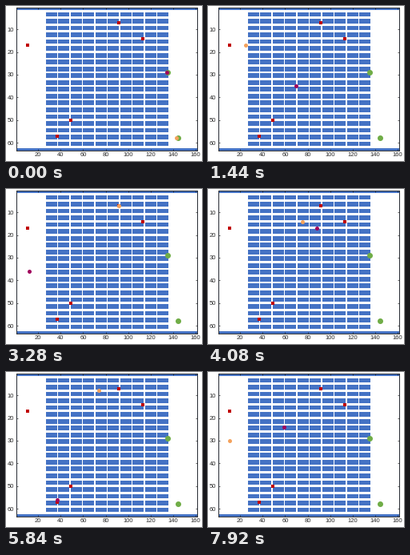
Recreate the animation shown at these times as a matplotlib script. Size 245 by 194 pixels, loop 8000 ms.

```python
import numpy as np
import matplotlib.pyplot as plt
from matplotlib.animation import FuncAnimation
from matplotlib.colors import ListedColormap

W, H, DPI = 245, 194, 100
FRAMES, INTERVAL = 100, 80
STEPS_PER_FRAME = 10
COLS, ROWS = 161, 63
BLUE, RED, GREEN = "#4472C4", "#C00000", "#70AD47"
ORANGE, PURPLE = "#F4A25C", "#A0005C"

plt.rcParams["font.family"] = "Liberation Sans"


def px(n):
    """Pixels to points."""
    return n * 72 / DPI


def warehouse():
    grid = np.zeros((ROWS, COLS))
    grid[[0, -1], :] = 1
    grid[:, [0, -1]] = 1
    for top in range(2, 61, 3):
        for left in range(26, 135, 11):
            grid[top:top + 2, left:left + 10] = 1
    return grid


def walk(waypoints):
    """One cell per step along straight legs; an optional third value is a wait."""
    x, y = waypoints[0][:2]
    path = [(x, y)]
    for gx, gy, *wait in waypoints[1:]:
        while (x, y) != (gx, gy):
            x += int(np.sign(gx - x))
            y += int(np.sign(gy - y))
            path.append((x, y))
        path += [(x, y)] * sum(wait)
    return path


orange_path = walk([
    (144, 58), (136, 58), (136, 8), (92, 8), (92, 7, 1),
    (92, 8), (59, 8), (59, 17), (11, 17, 1),
    (14, 17), (14, 23), (23, 23), (23, 50), (49, 50),
    (92, 50), (92, 7, 78),
    (92, 8), (103, 8), (103, 14), (113, 14, 14),
    (59, 14), (59, 53), (37, 53), (37, 57),
    (37, 56), (24, 56), (24, 40), (11, 40), (11, 17, 1),
    (24, 17), (24, 8), (92, 8), (92, 7, 37),
    (92, 8), (103, 8), (103, 14), (113, 14, 2),
    (59, 14, 2), (59, 53), (37, 53), (37, 57),
    (37, 53), (11, 53), (11, 17),
])

purple_path = walk([
    (135, 29), (48, 29), (48, 53), (37, 53), (37, 57),
    (37, 53), (70, 53), (70, 17), (103, 17), (103, 14), (113, 14, 1),
    (70, 14), (70, 56), (37, 56), (37, 57),
    (37, 56), (12, 56), (12, 17), (11, 17, 3),
    (103, 17), (103, 14), (113, 14),
    (103, 14), (103, 8), (92, 8), (92, 7),
    (92, 8), (103, 8), (103, 14), (113, 14, 8),
    (70, 14), (70, 56), (37, 56), (37, 57, 8),
    (37, 56), (15, 56), (15, 22), (11, 22), (11, 17),
    (103, 17), (103, 14), (113, 14, 1),
    (103, 14), (103, 8), (92, 8), (92, 7, 11),
    (92, 8), (59, 8), (59, 26),
])

fig = plt.figure(figsize=(W / DPI, H / DPI), dpi=DPI, facecolor="white")
left, right, top, bottom = 12.7, 239.2, 2.2, 181
ax = fig.add_axes([left / W, 1 - bottom / H, (right - left) / W, (bottom - top) / H])
ax.imshow(warehouse(), cmap=ListedColormap(["white", BLUE]), aspect="auto",
          interpolation="nearest", extent=(0.5, COLS + 0.5, ROWS + 0.5, 0.5))
ax.set_xticks(range(20, 161, 20))
ax.set_yticks(range(10, 61, 10))
ax.tick_params(direction="in", top=True, right=True, length=px(2), width=px(0.7),
               pad=px(2.5), labelsize=px(7.6), labelcolor="#262626", color="#262626")
for spine in ax.spines.values():
    spine.set(linewidth=px(0.9), color="#262626")


def dots(points, marker, size, color):
    xs, ys = zip(*points)
    return ax.plot(xs, ys, marker, ms=px(size), color=color, mew=0,
                   ls="none", clip_on=False)[0]


dots([(135, 29), (144, 58)], "o", 7, GREEN)
dots([(11, 17), (92, 7), (113, 14), (49, 50), (37, 57)], "s", 4.2, RED)
agents = [(dots(path[:1], "o", 5, color), path)
          for path, color in ((orange_path, ORANGE), (purple_path, PURPLE))]


def update(frame):
    step = STEPS_PER_FRAME * frame + 1
    for dot, path in agents:
        x, y = path[min(step, len(path) - 1)]
        dot.set_data([x], [y])
    return [dot for dot, _ in agents]


anim = FuncAnimation(fig, update, frames=FRAMES, interval=INTERVAL,
                     repeat=True, repeat_delay=0)
plt.show()
```
